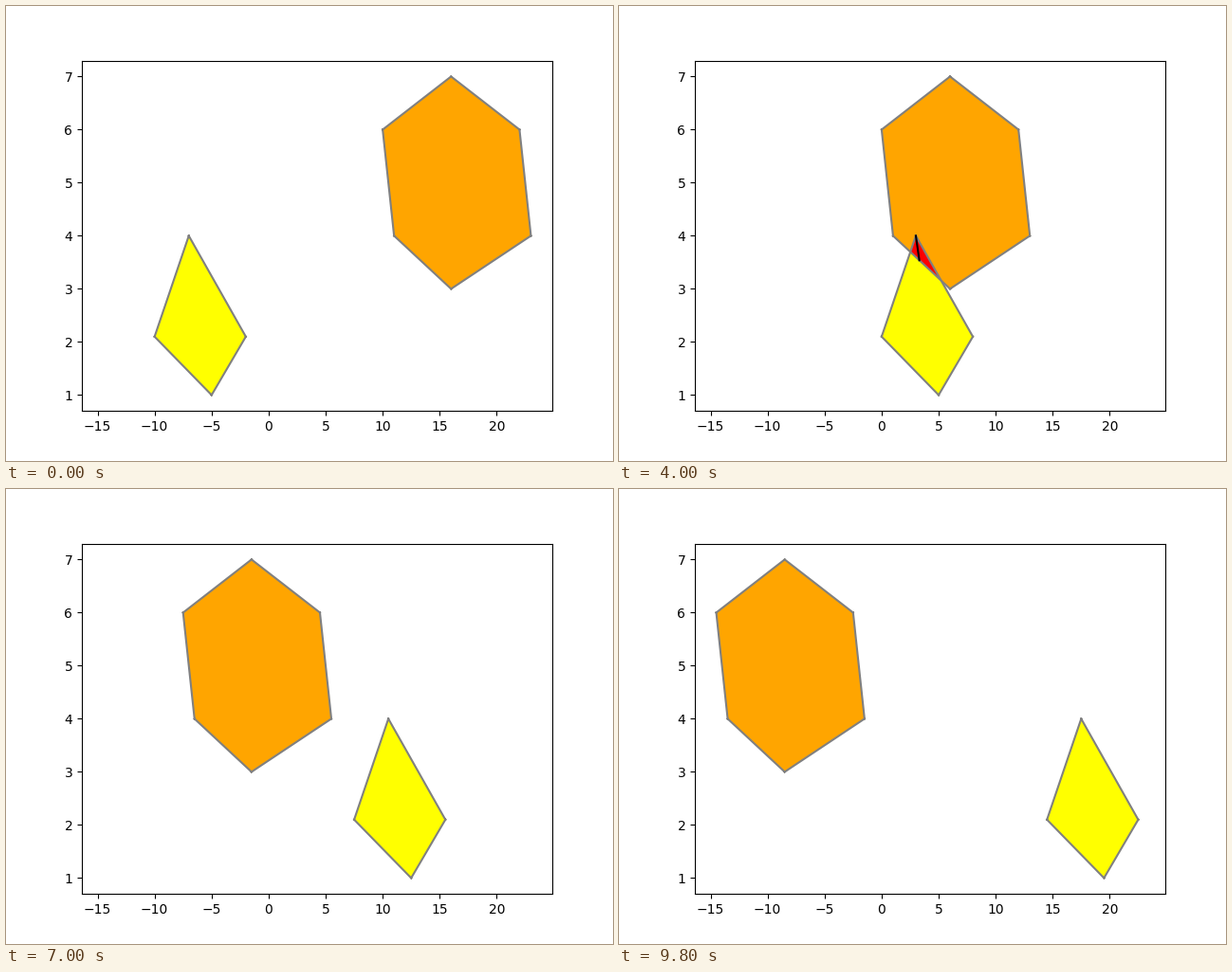
A matplotlib script that plays this animation: 640x480 px, repeating every 10000 ms.

```python
import numpy as np
import matplotlib.pyplot as plt
from matplotlib.animation import FuncAnimation

FRAMES = 50
STEP = 0.5  # units travelled per frame

# Corners run clockwise.
KITE = np.array([(-7, 4), (-2, 2.1), (-5, 1), (-10, 2.1)], float)
HEXAGON = np.array([(10, 6), (16, 7), (22, 6), (23, 4), (16, 3), (11, 4)], float)


def side(a, b, p):
    """Positive when p lies to the right of the line from a to b."""
    return (p[0] - a[0]) * (b[1] - a[1]) - (p[1] - a[1]) * (b[0] - a[0])


def clip(points, window):
    """Part of a polygon or segment inside a convex clockwise window."""
    for a, b in zip(window, np.roll(window, -1, axis=0)):
        kept = []
        for i, cur in enumerate(points):
            prev = points[i - 1]
            d0, d1 = side(a, b, prev), side(a, b, cur)
            if (d0 > 0) != (d1 > 0):
                kept.append(prev + (cur - prev) * d0 / (d0 - d1))
            if d1 > 0:
                kept.append(cur)
        points = kept
    return points


def edges(poly):
    """Each side as a separate stroke, divided by NaN rows."""
    rows = []
    for a, b in zip(poly, np.roll(poly, -1, axis=0)):
        rows += [a, b, (np.nan, np.nan)]
    return np.array(rows).T


fig, ax = plt.subplots(figsize=(6.4, 4.8), dpi=100)
ax.set_xlim(-16.375, 24.875)
ax.set_ylim(0.7, 7.3)

kite_fill, = ax.fill(*KITE.T, facecolor="yellow", lw=0)
hex_fill, = ax.fill(*HEXAGON.T, facecolor="orange", lw=0)
overlap_fill, = ax.fill(*KITE.T, facecolor="red", lw=0)
kite_line, = ax.plot([], [], color="gray", lw=1.5)
hex_line, = ax.plot([], [], color="gray", lw=1.5)
axis_line, = ax.plot([], [], color="black", lw=1.5)


def update(k):
    shift = np.array([STEP * k, 0])
    kite, hexagon = KITE + shift, HEXAGON - shift
    kite_fill.set_xy(kite)
    hex_fill.set_xy(hexagon)
    kite_line.set_data(*edges(kite))
    hex_line.set_data(*edges(hexagon))

    overlap = clip(list(kite), hexagon)
    hit = len(overlap) > 2
    overlap_fill.set_visible(hit)
    axis_line.set_visible(hit)
    if hit:
        overlap_fill.set_xy(overlap)
        inner = clip([kite[0], kite[2]], hexagon)[:2]
        axis_line.set_data([p[0] for p in inner], [p[1] for p in inner])
    return kite_fill, hex_fill, overlap_fill, kite_line, hex_line, axis_line


anim = FuncAnimation(fig, update, frames=FRAMES, interval=200,
                     init_func=lambda: update(0), repeat=True, repeat_delay=0)
plt.show()
```
